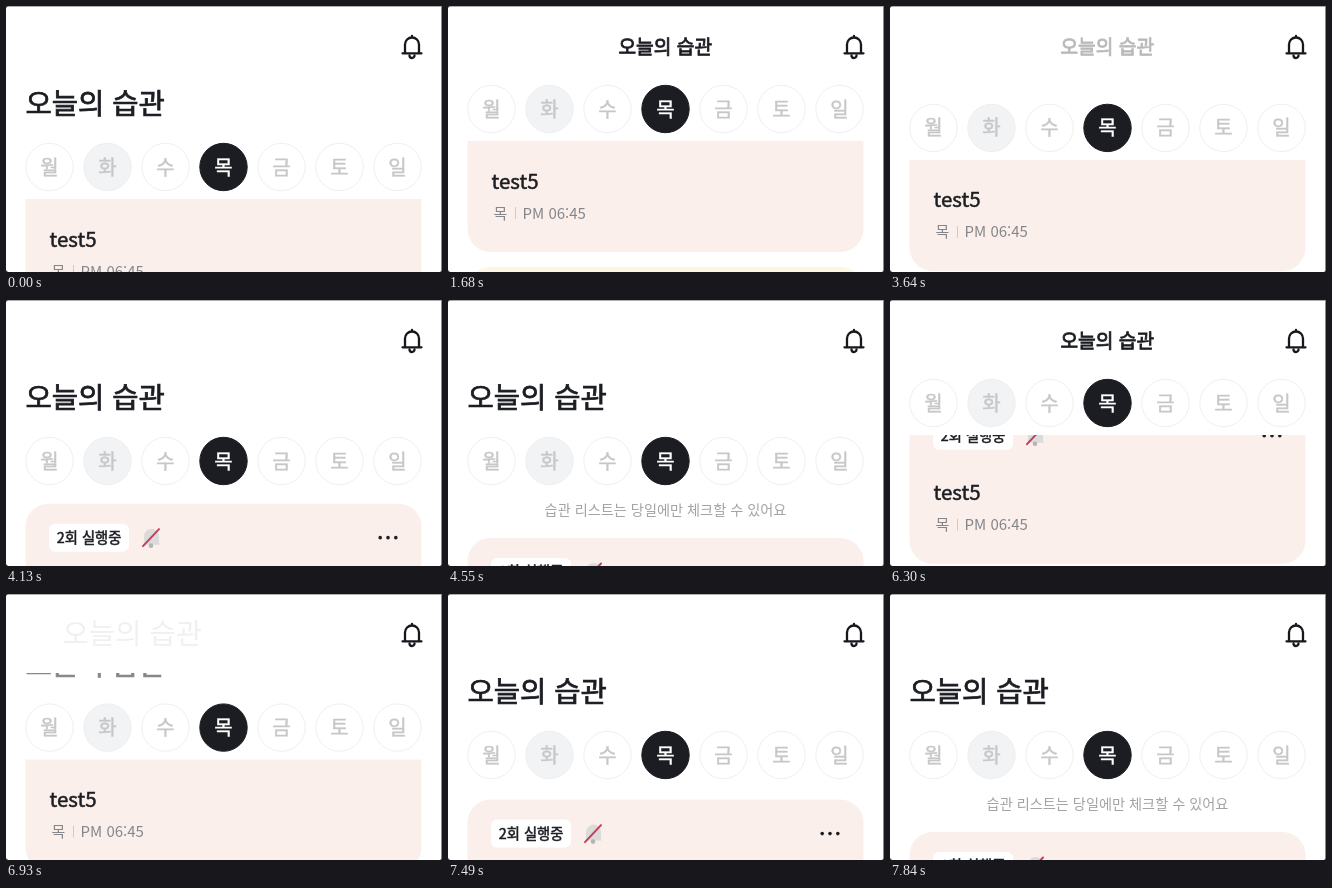
An HTML page for the animation above (8610 ms loop, 436 by 266 pixels).

```html
<!DOCTYPE html>
<html lang="ko">
<head>
<meta charset="utf-8">
<style>
  html, body { margin: 0; width: 100%; height: 100%; overflow: hidden; background: #fff; }
  svg { display: block; width: 436px; height: 266px; font-family: "Noto Sans CJK KR", "Noto Sans CJK", sans-serif; }
  .mid { text-anchor: middle; }
  /* a thin outline gives the medium weight */
  .medium { stroke: #1b1d22; stroke-width: .5; }
</style>
</head>
<body>
<svg viewBox="0 0 436 266" fill="#1b1d22">
  <g id="list">
    <text class="mid" x="217.5" y="21.5" font-size="14.2" fill="#a2a2a2">습관 리스트는 당일에만 체크할 수 있어요</text>
    <rect x="19.5" y="45" width="396" height="162" rx="23" fill="#fbefeb"/>
    <rect x="43" y="65" width="80" height="28" rx="6" fill="#fff"/>
    <text class="medium" x="50.8" y="84" font-size="14.3">2회 실행중</text>
    <path d="M138 84V78a7.5 8 0 0 1 15 0V84l1 2H137Z" fill="#dcdbdb"/>
    <circle cx="145" cy="87" r="2.3" fill="#b5b4b5"/>
    <path d="M137 87.500L153 70.500" stroke="#c53d5c" stroke-width="2" stroke-linecap="round"/>
    <circle cx="374.2" cy="79" r="1.8"/><circle cx="382" cy="79" r="1.8"/><circle cx="389.8" cy="79" r="1.8"/>
    <text class="medium" x="43.5" y="143.5" font-size="20.5">test5</text>
    <g font-size="15" fill="#85868a">
      <text x="45.5" y="173.5">목</text>
      <text x="74.5" y="173.5">PM 06:45</text>
    </g>
    <path d="M67.5 162V174" stroke="#cfcaca"/>
    <rect x="19.5" y="222" width="396" height="162" rx="23" fill="#fdf6e4"/>
  </g>

  <rect id="cover" width="436" fill="#fff"/>
  <text id="large" class="medium" x="19.4" font-size="28.6" style="stroke-width:.75">오늘의 습관</text>
  <rect width="436" height="79" fill="#fff"/>
  <text id="small" class="mid medium" x="217.3" y="47.8" font-size="19.2" style="stroke-width:.8">오늘의 습관</text>
  <text id="ghost" y="50" font-size="28.6" font-weight="300">오늘의 습관</text>
  <g id="week" font-size="20" text-anchor="middle"></g>

  <g fill="none" stroke="#16181d" stroke-width="2.3" stroke-linecap="round" stroke-linejoin="round">
    <path d="M399 47V38.500a7 7 0 0 1 14 0V47M396.500 47.300H415.500M406 31V30"/>
    <path d="M403.500 49.500a2.500 2.500 0 0 0 5 0"/>
  </g>
  <path d="M0 .5H436" stroke="#aeaeae"/>
  <path d="M435.500 0V266" stroke="#8c8c8c"/>
  <path d="M0 264L2 266H0ZM436 264L434 266H436ZM0 2L2 0H0Z" fill="#444"/>
</svg>
<script>
const $ = id => document.getElementById(id);
const LOOP = 8610, STEP = 70;
const HEAD = 58;      // height the header gains when open
const SCROLL = 96;    // list offset when scrolled
const TRAVEL = HEAD + SCROLL;

$('week').innerHTML = [...'월화수목금토일'].map((day, i) => {
  const x = 43.5 + 58 * i;
  const today = i == 3;
  const fill = today ? '#1b1d22' : i == 1 ? '#f1f3f5' : '#fff';
  const ink = today ? '#fff' : '#c6c7c9';
  return `<circle cx="${x}" cy="103" r="23.7" fill="${fill}" stroke="${today ? fill : '#eeeff0'}"/>` +
    `<text x="${x}" y="110.5" fill="${ink}" stroke="${ink}" stroke-width=".45">${day}</text>`;
}).join('');

const clamp = v => Math.max(0, Math.min(1, v));
const part = (t, a, b) => clamp((t - a) / (b - a));
const smooth = u => u * u * (3 - 2 * u);
const easeOut = (u, n) => 1 - (1 - u) ** n;

// The header always takes the drag first, the list gets the rest.
function pose(t) {
  const open = d => [Math.min(HEAD, d), SCROLL - Math.max(0, d - HEAD)];
  const close = d => [HEAD - Math.min(HEAD, d), Math.max(0, d - HEAD)];
  if (t < 3570) return [HEAD * (1 - smooth(part(t, 1470, 1680))), SCROLL];
  if (t < 5515) return open(TRAVEL * easeOut(part(t, 3570, 4550), 1.77));
  if (t < 6774) return close(TRAVEL * smooth(part(t, 5515, 6510)));
  return open(TRAVEL * easeOut(part(t, 6774, 7840), 1.4));
}

function move(id, y) { $(id).setAttribute('transform', `translate(0 ${y.toFixed(2)})`); }

function draw(now) {
  const t = Math.floor(now % LOOP / STEP) * STEP;
  const [head, scroll] = pose(t);
  const shown = head / HEAD;
  move('list', 135 + head - scroll);
  move('week', head);
  move('large', 50 + head);
  $('cover').setAttribute('height', 135 + head);
  $('large').setAttribute('opacity', shown);
  $('small').setAttribute('opacity', clamp(1 - 2.12 * shown));
  $('ghost').setAttribute('x', 171 - 217 * shown);
  $('ghost').setAttribute('opacity', shown > .46 && shown < .62 ? .06 : 0);
}

const start = performance.now();
function tick() {
  draw(performance.now() - start);
  requestAnimationFrame(tick);
}
tick();
</script>
</body>
</html>
```
